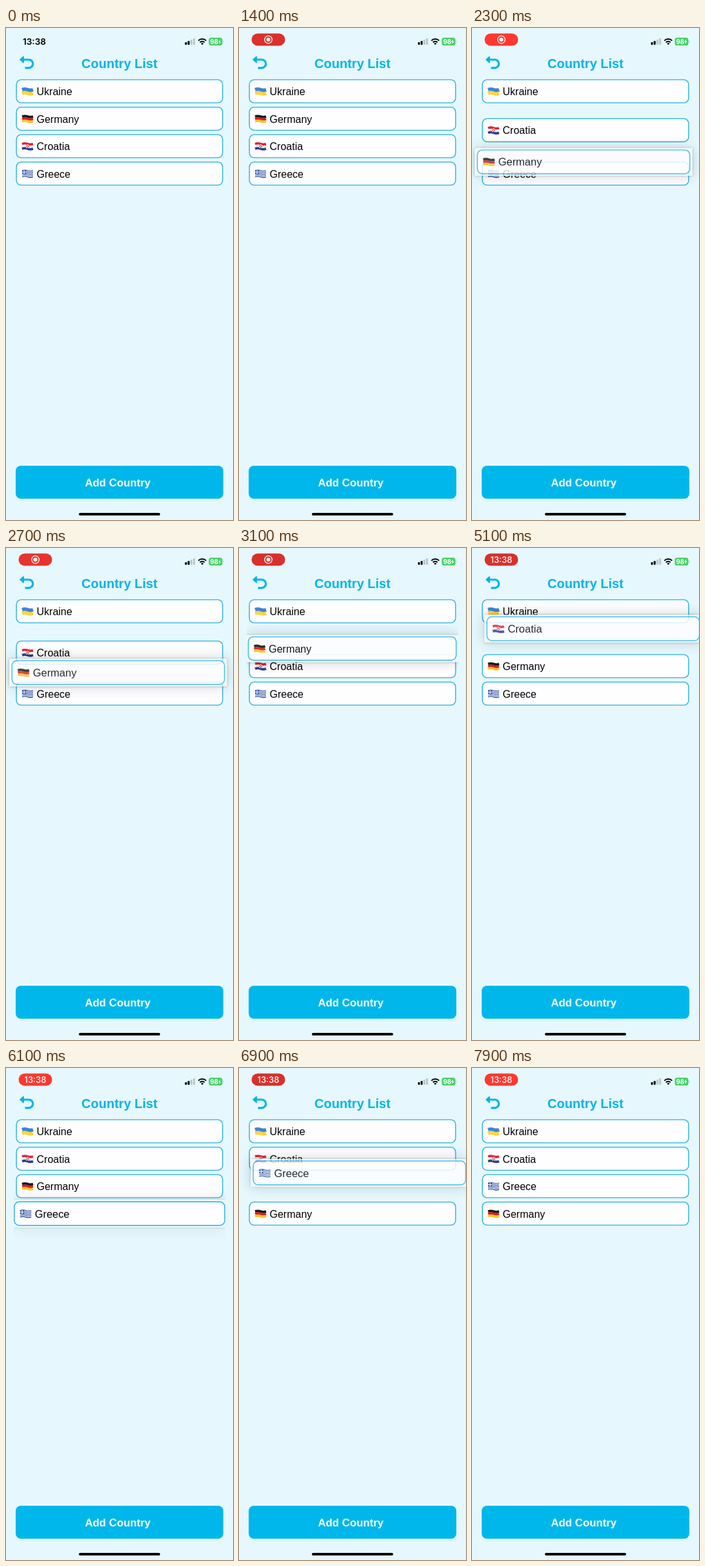
An HTML page for the animation above (8 s loop, 352 by 762 pixels).

```html
<!DOCTYPE html>
<html lang="en">
<head>
<meta charset="utf-8">
<title>Country List</title>
<style>
html, body { margin: 0; width: 100%; height: 100%; overflow: hidden; }
body { position: relative; background: #e6f8fd; }
svg { display: block; }
text { font-family: "Liberation Sans", Arial, sans-serif; }
.screen { position: absolute; left: 0; top: 0; }
.clock { font: 600 13.6px Inter, sans-serif; text-anchor: middle; }
.mid { text-anchor: middle; font-weight: bold; }

.lane { position: absolute; left: 0; top: 0; width: 352px; height: 762px; clip-path: inset(0 12px); z-index: 1; }
.cell { position: absolute; left: 12px; top: 77px; width: 328px; height: 42px; }
.lane, .cell, .anim { animation: 8s linear infinite; }

/* Recording badge */
#plain { animation-name: plain; }
#badge { animation-name: badge; }
#pill { animation-name: pulse; animation-timing-function: ease-in-out; }
#rec { animation-name: rec; }
#time { animation-name: time; }
@keyframes plain { 0%, 2.5% { opacity: 1; } 5%, 100% { opacity: 0; } }
@keyframes badge { 0%, 3% { opacity: 0; } 6.25%, 100% { opacity: 1; } }
@keyframes rec { 0%, 43% { opacity: 1; } 46%, 100% { opacity: 0; } }
@keyframes time { 0%, 44% { opacity: 0; } 47%, 100% { opacity: 1; } }
@keyframes pulse {
  0%, 3.75%, 27.5%, 51.25%, 53.5%, 75%, 98.75%, 100% { fill: #ff3830; }
  15.6%, 39%, 63.4%, 86.6% { fill: #d9302c; }
}

/* Row order: transform = place, look = lift shadow, lane = stacking and clip */
#ukraine .cell { transform: none; }
#germany { animation-name: germany-lane; animation-timing-function: step-end; }
#germany .cell { animation-name: germany, germany-look; animation-duration: 8s; animation-iteration-count: infinite; }
#croatia { animation-name: croatia-lane; animation-timing-function: step-end; }
#croatia .cell { animation-name: croatia, croatia-look; animation-duration: 8s; animation-iteration-count: infinite; }
#greece { animation-name: greece-lane; animation-timing-function: step-end; }
#greece .cell { animation-name: greece, greece-look; animation-duration: 8s; animation-iteration-count: infinite; }

@keyframes germany {
  0% { transform: translate(0, 42.5px) scale(1); }
  17.5% { transform: translate(0, 42.5px) scale(1); animation-timing-function: ease-out; }
  22.5% { transform: translate(0, 42.5px) scale(1.03); }
  25.6% { transform: translate(-1px, 43px) scale(1.03); }
  28.75% { transform: translate(-3px, 109.2px) scale(1.03); animation-timing-function: ease-out; }
  30.6% { transform: translate(-3px, 118px) scale(1.03); animation-timing-function: ease-in; }
  33.75% { transform: translate(-2px, 95px) scale(1.03); }
  36.9% { transform: translate(-2px, 64px) scale(1.03); }
  38.75% { transform: translate(-.4px, 57.8px) scale(1.008); animation-timing-function: ease-out; }
  41.9% { transform: translate(0, 42.5px) scale(1); }
  59.4% { transform: translate(0, 42.5px) scale(1); animation-timing-function: ease-in-out; }
  63.1% { transform: translate(0, 85px) scale(1); }
  81.9% { transform: translate(0, 85px) scale(1); animation-timing-function: ease-in-out; }
  85.6%, 100% { transform: translate(0, 127.5px) scale(1); }
}
@keyframes croatia {
  0%, 26.9% { transform: translate(0, 85px) scale(1); }
  28.75% { transform: translate(0, 60.5px) scale(1); animation-timing-function: ease-out; }
  30.6% { transform: translate(0, 42.5px) scale(1); }
  31.9% { transform: translate(0, 42.5px) scale(1); animation-timing-function: ease-in-out; }
  35.6% { transform: translate(0, 85px) scale(1); }
  51.9% { transform: translate(0, 85px) scale(1); animation-timing-function: ease-out; }
  55% { transform: translate(0, 85px) scale(1.03); }
  56.9% { transform: translate(0, 85px) scale(1.03); animation-timing-function: ease-in; }
  60.6% { transform: translate(9px, 52px) scale(1.03); animation-timing-function: ease-out; }
  63.75% { transform: translate(11.8px, 27px) scale(1.03); animation-timing-function: ease-in-out; }
  66.9% { transform: translate(8px, 30px) scale(1.03); animation-timing-function: ease-out; }
  71.9%, 100% { transform: translate(0, 42.5px) scale(1); }
}
@keyframes greece {
  0% { transform: translate(0, 127.5px) scale(1); }
  74.4% { transform: translate(0, 127.5px) scale(1); animation-timing-function: ease-out; }
  78.1% { transform: translate(0, 127.5px) scale(1.03); }
  80% { transform: translate(0, 127.5px) scale(1.03); animation-timing-function: ease-in; }
  83.75% { transform: translate(9px, 78px) scale(1.03); animation-timing-function: ease-out; }
  86.25% { transform: translate(10.8px, 64.5px) scale(1.03); animation-timing-function: ease-in-out; }
  90.6% { transform: translate(8px, 70px) scale(1.03); animation-timing-function: ease-out; }
  96.25%, 100% { transform: translate(0, 85px) scale(1); }
}

:root {
  --flat: 0 0 22px rgba(0,0,0,0), 0 0 3px rgba(0,0,0,0);
  --lift: 0 0 22px rgba(0,0,0,.2), 0 0 3px rgba(0,0,0,.3);
}
@keyframes germany-look {
  0%, 17.5%, 41.9%, 100% { opacity: 1; box-shadow: var(--flat); background: #eef9fd00; }
  22.5%, 25% { opacity: 1; box-shadow: var(--lift); background: #eef9fd; }
  27%, 36.9% { opacity: .82; box-shadow: var(--lift); background: #eef9fd; }
  38.75% { opacity: .92; box-shadow: var(--lift); background: #eef9fd; }
}
@keyframes croatia-look {
  0%, 51.9%, 71.9%, 100% { opacity: 1; box-shadow: var(--flat); background: #eef9fd00; }
  55%, 56.9% { opacity: 1; box-shadow: var(--lift); background: #eef9fd; }
  59%, 66.9% { opacity: .82; box-shadow: var(--lift); background: #eef9fd; }
  69% { opacity: .92; box-shadow: var(--lift); background: #eef9fd; }
}
@keyframes greece-look {
  0%, 74.4%, 96.25%, 100% { opacity: 1; box-shadow: var(--flat); background: #eef9fd00; }
  78.1%, 80% { opacity: 1; box-shadow: var(--lift); background: #eef9fd; }
  82%, 90.6% { opacity: .82; box-shadow: var(--lift); background: #eef9fd; }
  93% { opacity: .92; box-shadow: var(--lift); background: #eef9fd; }
}
@keyframes germany-lane {
  0%, 41.9%, 100% { z-index: 1; clip-path: inset(0 12px); }
  17.5%, 37% { z-index: 2; clip-path: inset(0 12px); }
  24.5% { z-index: 2; clip-path: inset(0); }
}
@keyframes croatia-lane {
  0%, 71.9%, 100% { z-index: 1; clip-path: inset(0 12px); }
  51.9%, 70% { z-index: 2; clip-path: inset(0 12px); }
  56.9% { z-index: 2; clip-path: inset(0); }
}
@keyframes greece-lane {
  0%, 96.25%, 100% { z-index: 1; clip-path: inset(0 12px); }
  74.4%, 94.5% { z-index: 2; clip-path: inset(0 12px); }
  80% { z-index: 2; clip-path: inset(0); }
}
</style>
</head>
<body>
<svg class="screen" width="352" height="762">
  <text id="plain" class="clock anim" x="44" y="26">13:38</text>
  <g id="badge" class="anim">
    <rect id="pill" class="anim" x="19.5" y="8.5" width="52" height="19" rx="9.5"/>
    <g id="rec" class="anim" fill="#fff">
      <circle cx="45.5" cy="18" r="5.8" fill="none" stroke="#fff" stroke-width="1.3"/>
      <circle cx="45.5" cy="18" r="3"/>
    </g>
    <g id="time" class="anim">
      <text class="clock" x="45.5" y="22.6" fill="#fff" style="font-size:13px;font-weight:500">13:38</text>
    </g>
  </g>

  <g>
    <rect x="277.5" y="22" width="3" height="4" rx=".8"/>
    <rect x="281.7" y="20" width="3" height="6" rx=".8"/>
    <g fill="#b9c6ca">
      <rect x="285.9" y="18" width="3" height="8" rx=".8"/>
      <rect x="290.1" y="16" width="3" height="10" rx=".8"/>
    </g>
  </g>
  <g fill="none" stroke="#000" stroke-width="2">
    <path d="M298.3 19.6a8.3 8.3 0 0 1 12 0"/>
    <path d="M300.8 22.2a4.9 4.9 0 0 1 7 0"/>
    <path d="M304.3 26.2l-2-2.2a2.8 2.8 0 0 1 4 0z" fill="#000" stroke="none"/>
  </g>
  <rect x="314.5" y="15" width="21" height="12" rx="3.6" fill="#45cf68"/>
  <path d="M336.4 19.2a2 2 0 0 1 0 3.8z" fill="#9fdcb4"/>
  <text x="316.5" y="24.6" fill="#fff" style="font:700 9.8px Inter,sans-serif">98</text>
  <path d="M332.2 17.2l-3.2 4.5h2l-.7 3.6 3.2-4.6h-2z" fill="#fff"/>

  <g fill="none" stroke="#00b4e8" stroke-width="3.2" stroke-linejoin="round">
    <path d="M23 49H35.3a6.3 6.3 0 0 1 0 12.8H29.5"/>
    <path d="M27 44.6L22.2 49l4.8 4.4z" fill="#00b4e8" stroke-width="1.8"/>
  </g>
  <text class="mid" x="176" y="61.5" font-size="20" fill="#00b4e8">Country List</text>

  <rect x="15" y="678" width="322" height="51" rx="8" fill="#00b7eb"/>
  <text class="mid" x="173.3" y="710" font-size="16.8" fill="#fff">Add Country</text>
  <rect x="113" y="751" width="126" height="4" rx="2"/>
</svg>

<script>
// Waving band of a 17 x 11.5 flag
const band = (y, h, color, x = 0) => {
  const w = 17 - x, m = y + h / 2;
  return `<path d="M${x} ${m}q${w / 4} -1.6 ${w / 2} 0t${w / 2} 0" fill="none" stroke="${color}" stroke-width="${h + .1}"/>`;
};
const bands = (...colors) =>
  colors.map((c, i) => band(i * 11 / colors.length, 11 / colors.length, c)).join('');
const box = (x, y, w, h, color) =>
  `<rect x="${x}" y="${y}" width="${w}" height="${h}" fill="${color}"/>`;

const blue = '#2c4f9e';
let shield = box(6.2, 2.4, 4.8, 5.6, '#fff');
for (let i = 0; i < 12; i++) {
  const r = Math.floor(i / 3), c = i % 3;
  if ((r + c) % 2 === 0) shield += box(6.2 + c * 1.6, 2.4 + r * 1.4, 1.6, 1.4, '#d8222c');
}
const stripes = Array.from({ length: 9 }, (_, i) => i % 2 ? '#f2f5fa' : blue);
const flags = {
  Ukraine: bands('#3f83d6', '#f7d640'),
  Germany: bands('#1a1a1a', '#d8201f', '#f6c52c'),
  Croatia: bands('#dc2430', '#f4f4f6', '#2b3f8f') + shield,
  Greece: bands(...stripes) + box(0, 0, 6.2, 5.8, blue) + box(2.5, 0, 1.2, 5.8, '#f2f5fa') + box(0, 2.3, 6.2, 1.2, '#f2f5fa')
};

for (const name in flags) {
  const lane = document.createElement('div');
  lane.className = 'lane';
  lane.id = name.toLowerCase();
  lane.innerHTML = `<div class="cell"><svg width="328" height="42" overflow="visible">
    <rect x="4.1" y="3.1" width="319.8" height="35.8" rx="7.5" fill="#fefdff" stroke="#27b1dd" stroke-width="1.4"/>
    <g transform="translate(13 15.8)">${flags[name]}</g>
    <text x="35.5" y="27" font-size="16">${name}</text></svg></div>`;
  document.body.append(lane);
}
</script>
</body>
</html>
```
